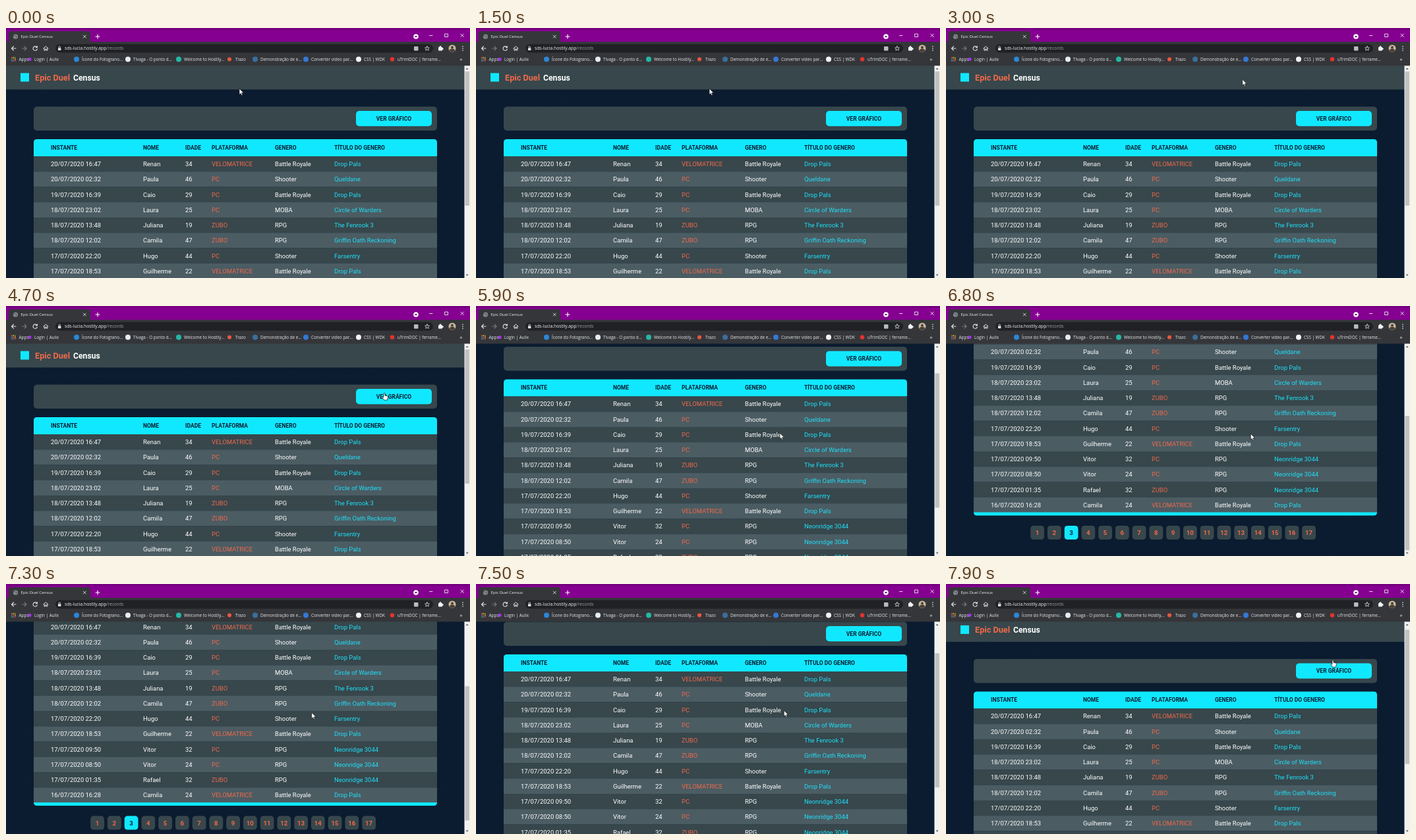
Animation, 704 px wide and 380 px high, one loop 8000 ms. Source, as an HTML page:

```html
<!DOCTYPE html>
<html lang="pt-BR">
<head>
<meta charset="utf-8">
<title>Epic Duel Census</title>
<style>
  html, body { margin: 0; width: 100%; height: 100%; overflow: hidden; background: #0b1c30; }
  svg { display: block; width: 704px; height: 380px; }
  text { white-space: pre; }
  .page { font-family: Roboto, Arial, sans-serif; }
  .ui { font-family: "Open Sans", "Noto Sans", sans-serif; }
</style>
</head>
<body>
<svg id="stage" viewBox="0 0 704 380" xmlns="http://www.w3.org/2000/svg"></svg>
<script>
const LOOP = 8000, STEP = 100;
const CYAN = '#10e8ff', ORANGE = '#f1694a', CARD = '#37474c', STRIPE = '#4b5c63', INK = '#0b1c30', UI = '#35363a';
const ROW_TOP = 195, ROW_H = 23.25;

const rect = (x, y, w, h, fill, r = 0) =>
  `<rect x="${x}" y="${y}" width="${w}" height="${h}" rx="${r}" fill="${fill}"/>`;
const circle = (x, y, r, fill) => `<circle cx="${x}" cy="${y}" r="${r}" fill="${fill}"/>`;
const stroke = (d, color, w = 1) =>
  `<path d="${d}" fill="none" stroke="${color}" stroke-width="${w}" stroke-linecap="round" stroke-linejoin="round"/>`;
// y is the vertical middle of the capitals
const label = (x, y, str, size, fill = '#fff', extra = '') =>
  `<text x="${x}" y="${y + size * 0.36}" font-size="${size}" fill="${fill}" ${extra}>${str}</text>`;
const BOLD = 'font-weight="700"';
const MID = BOLD + ' text-anchor="middle"';

const columns = [68, 208, 272, 312, 408, 498];
const heads = ['INSTANTE', 'NOME', 'IDADE', 'PLATAFORMA', 'GENERO', 'TÍTULO DO GENERO'];
const records = `20/07/2020 16:47,Renan,34,VELOMATRICE,Battle Royale,Drop Pals
20/07/2020 02:32,Paula,46,PC,Shooter,Queldane
19/07/2020 16:39,Caio,29,PC,Battle Royale,Drop Pals
18/07/2020 23:02,Laura,25,PC,MOBA,Circle of Warders
18/07/2020 13:48,Juliana,19,ZUBO,RPG,The Fenrook 3
18/07/2020 12:02,Camila,47,ZUBO,RPG,Griffin Oath Reckoning
17/07/2020 22:20,Hugo,44,PC,Shooter,Farsentry
17/07/2020 18:53,Guilherme,22,VELOMATRICE,Battle Royale,Drop Pals
17/07/2020 09:50,Vitor,32,PC,RPG,Neonridge 3044
17/07/2020 08:50,Vitor,24,PC,RPG,Neonridge 3044
17/07/2020 01:35,Rafael,32,ZUBO,RPG,Neonridge 3044
16/07/2020 16:28,Camila,24,VELOMATRICE,Battle Royale,Drop Pals`
  .split('\n').map(line => line.split(','));

function stars() {
  let seed = 7, out = '';
  const random = () => (seed = (seed * 16807) % 2147483647) / 2147483647;
  for (let i = 0; i < 260; i++) {
    out += `M${(random() * 695).toFixed(1)} ${(93 + random() * 450).toFixed(1)}h.8`;
  }
  return `<path d="${out}" stroke="#1c3a52" stroke-width=".8"/>`;
}

function table() {
  const end = ROW_TOP + ROW_H * records.length;
  let out = `<path d="M42 ${ROW_TOP}V174q0-5 5-5H649q5 0 5 5V${ROW_TOP}z" fill="${CYAN}"/>`;
  heads.forEach((h, i) => out += label(columns[i], 181.8, h, 8.5, INK, BOLD));
  records.forEach((cells, r) => {
    const top = ROW_TOP + r * ROW_H;
    out += rect(42, top, 612, ROW_H + 0.1, r % 2 ? STRIPE : CARD);
    cells.forEach((c, i) =>
      out += label(columns[i], top + 11.7, c, 9.45, ['#fff', '#fff', '#fff', ORANGE, '#fff', '#20dff7'][i]));
  });
  return out + `<path d="M42 ${end - 0.5}H654q0 5-5 5H47q-5 0-5-5z" fill="${CYAN}"/>`;
}

function pagination() {
  let out = '';
  for (let n = 1; n <= 17; n++) {
    const x = 128.2 + (n - 1) * 25.75, active = n === 3;
    out += rect(x, 494, 20.8, 21, active ? CYAN : CARD, 4.5) +
      label(x + 10.4, 504.8, n, 9.6, active ? INK : ORANGE, MID);
  }
  return out;
}

const page = () => stars() +
  rect(0, 57, 696, 36.5, CARD) +
  rect(22, 68.5, 13, 13, CYAN) +
  label(44, 75.2, 'Epic Duel', 12.7, ORANGE, BOLD) +
  label(102, 75.2, 'Census', 12.2, '#fff', BOLD) +
  rect(42, 119.5, 612, 36.5, CARD, 5) +
  rect(531, 126, 115, 23.3, CYAN, 5) +
  label(588.5, 137.6, 'VER GRÁFICO', 8.5, INK, MID) +
  table() + pagination();

// icon x, icon colour, text x, text
const bookmarks = [
  [36, '#a435f0', 43, 'Login | Aulix', 2.5],
  [107, '#2b87d8', 115, 'Ícone do Fotograno...'],
  [185, '#e4eef4', 193, 'TIvaga - O ponto d...'],
  [262, '#25b8a5', 270, 'Welcome to Hostily...'],
  [339, '#e8583f', 348, 'Trazo', 3],
  [378, '#3a6f9c', 386, 'Demonstração de e...'],
  [455, '#3478d4', 463, 'Converter vídeo par...'],
  [535, '#f4f4f4', 543, 'CSS | WDK'],
  [586, '#e5322d', 594, 'uTrimDOC | ferrame...', 3.2]
];

function browser() {
  const soft = '#dfe1e5';
  let out = rect(0, 0, 704, 22, '#850090') + rect(0, 0, 704, 3, '#76007f') +
    `<path d="M0 22q4 0 4-4V9q0-4 4-4H124q4 0 4 4v9q0 4 4 4z" fill="${UI}"/>` +
    circle(14.5, 13.2, 3.6, '#858b91') + stroke('M11.5 12h4l1 2-2 2', '#45484c', .9) +
    label(22.5, 13.2, 'Epic Duel Census', 6.1, '#f1f1f1') +
    stroke('M117.3 11l4 4m0-4l-4 4', soft, .9) +
    stroke('M136 13h6m-3-3v6', '#fff', 1.1) +
    circle(622, 13, 3.8, '#fff') + '<path d="M620 12h4l-2 2.7z" fill="#650070"/>' +
    stroke('M642.5 11.5h4.5M666 9h4.5v4.5h-4.5zM690 9l4.5 4.5m0-4.5l-4.5 4.5', '#fff', .8);

  out += rect(0, 21, 704, 36.3, UI) + rect(75, 24.5, 573, 13, '#202124', 6.5) +
    stroke('M15 31H8.5m3-3l-3 3 3 3', soft, 1.1) +
    stroke('M24.5 31H31m-3-3l3 3-3 3', '#75787c', 1.1) +
    stroke('M46.7 29a3.2 3.2 0 1 0 .6 3M47.4 27.6v2.2h-2.2', soft, 1.1) +
    stroke('M56.8 31l3.6-3.2L64 31M58 30.5V34h1.6v-2h1.6v2h1.6v-3.5', soft, 1) +
    rect(79, 30.3, 4.4, 3.7, soft, .5) + stroke('M80 30v-1a1.2 1.2 0 0 1 2.4 0v1', soft, .8) +
    label(89, 31, 'sds-lucia.hostily.app<tspan fill="#9aa0a6">/records</tspan>', 6.75, '#f1f3f4') +
    rect(619, 28, 6.5, 6.5, '#b7bcc2', 1) +
    stroke('M639 27.7l1 2.2 2.4.2-1.8 1.6.6 2.4-2.2-1.3-2.2 1.3.6-2.4-1.8-1.6 2.4-.2z', soft, .8) +
    rect(656, 29, 6, 5.5, '#f1f3f4', .8) + circle(659, 28.6, 1.4, '#f1f3f4') + circle(662.3, 31.7, 1.4, '#f1f3f4') +
    circle(677, 31, 5.5, '#c7b99d') + circle(677, 29.4, 2, '#4a3e35') +
    '<path d="M673 34.7q0-3.3 4-3.3t4 3.3q-4 3.5-8 0z" fill="#4a3e35"/>' +
    [28, 31, 34].map(y => circle(693, y, .85, soft)).join('');

  const dots = ['#ea4335', '#fbbc04', '#34a853', '#4285f4', '#ea4335', '#fbbc04', '#34a853', '#4285f4', '#ea4335'];
  dots.forEach((c, i) => out += rect(8 + i % 3 * 2.5, 44 + Math.floor(i / 3) * 2.5, 1.7, 1.7, c));
  out += label(19.5, 47.5, 'Apps', 6.4, '#e8eaed');
  bookmarks.forEach(([x, color, tx, str, r = 4]) =>
    out += circle(x, 47.5, r, color) + label(tx, 47.5, str, 6.3, '#e8eaed'));
  return out + label(688.5, 47, '»', 8, '#fff');
}

const arrow = 'M0 0V9.3L2.1 7.4 3.5 10.5 5 9.8 3.6 6.8H6.6Z';
const hand = 'M-1 .8Q0-.6 1 .8V4L4.8 5Q5.7 5.4 5.4 6.6L4.4 11H-.3L-3 7.3Q-3.2 5.9-1.9 6.3L-1 7Z';

document.getElementById('stage').innerHTML =
  rect(0, 0, 704, 380, INK) +
  `<g id="page" class="page">${page()}</g>` +
  rect(695.5, 57, 8.5, 323, '#f1f1f1') +
  '<rect id="thumb" x="696.5" width="6.5" height="204" fill="#c1c1c1"/>' +
  '<path d="M697.7 63l2-2.3 2 2.3zM697.7 374.5l2 2.3 2-2.3z" fill="#555"/>' +
  `<g class="ui">${browser()}</g>` +
  '<path id="cursor" fill="#fff" stroke="#111" stroke-width=".7" stroke-linejoin="round"/>';

const [pageEl, thumbEl, cursorEl] = ['page', 'thumb', 'cursor'].map(id => document.getElementById(id));

// wheel gesture: [ms since start, share of the way]
const wheel = [[0, 0], [100, .116], [200, .36], [300, .612], [400, .765], [500, .86], [600, .925], [700, .965], [800, 1]];
const pointer = [
  [0, 354, 92], [2700, 354, 92], [3000, 449.7, 78], [4200, 449.7, 78], [4400, 552, 104], [4500, 574, 132],
  [5000, 574, 132], [5500, 461, 193], [6400, 461, 193], [7300, 463.7, 195.3], [7500, 467.2, 192],
  [7600, 472, 188], [7900, 587, 115.3]
];

function track(keys, t) {
  const next = keys.findIndex(k => k[0] > t);
  if (next < 0) return keys[keys.length - 1].slice(1);
  if (next === 0) return keys[0].slice(1);
  const a = keys[next - 1], b = keys[next], p = (t - a[0]) / (b[0] - a[0]);
  return a.slice(1).map((v, i) => v + (b[i + 1] - v) * p);
}

function draw(t) {
  const scroll = 160 * (track(wheel, t - 5700)[0] - track(wheel, t - 7200)[0]);
  const [x, y] = track(pointer, t);
  const overButton = (t >= 4500 && t <= 5000) || t >= 7900;
  pageEl.setAttribute('transform', `translate(0 ${-scroll})`);
  thumbEl.setAttribute('y', 66 + scroll * 0.632);
  cursorEl.setAttribute('d', overButton ? hand : arrow);
  cursorEl.setAttribute('transform', `translate(${x} ${y})`);
}

const start = performance.now();
function tick() {
  const t = (performance.now() - start) % LOOP;
  draw(Math.floor(t / STEP) * STEP);
  requestAnimationFrame(tick);
}
tick();
</script>
</body>
</html>
```
